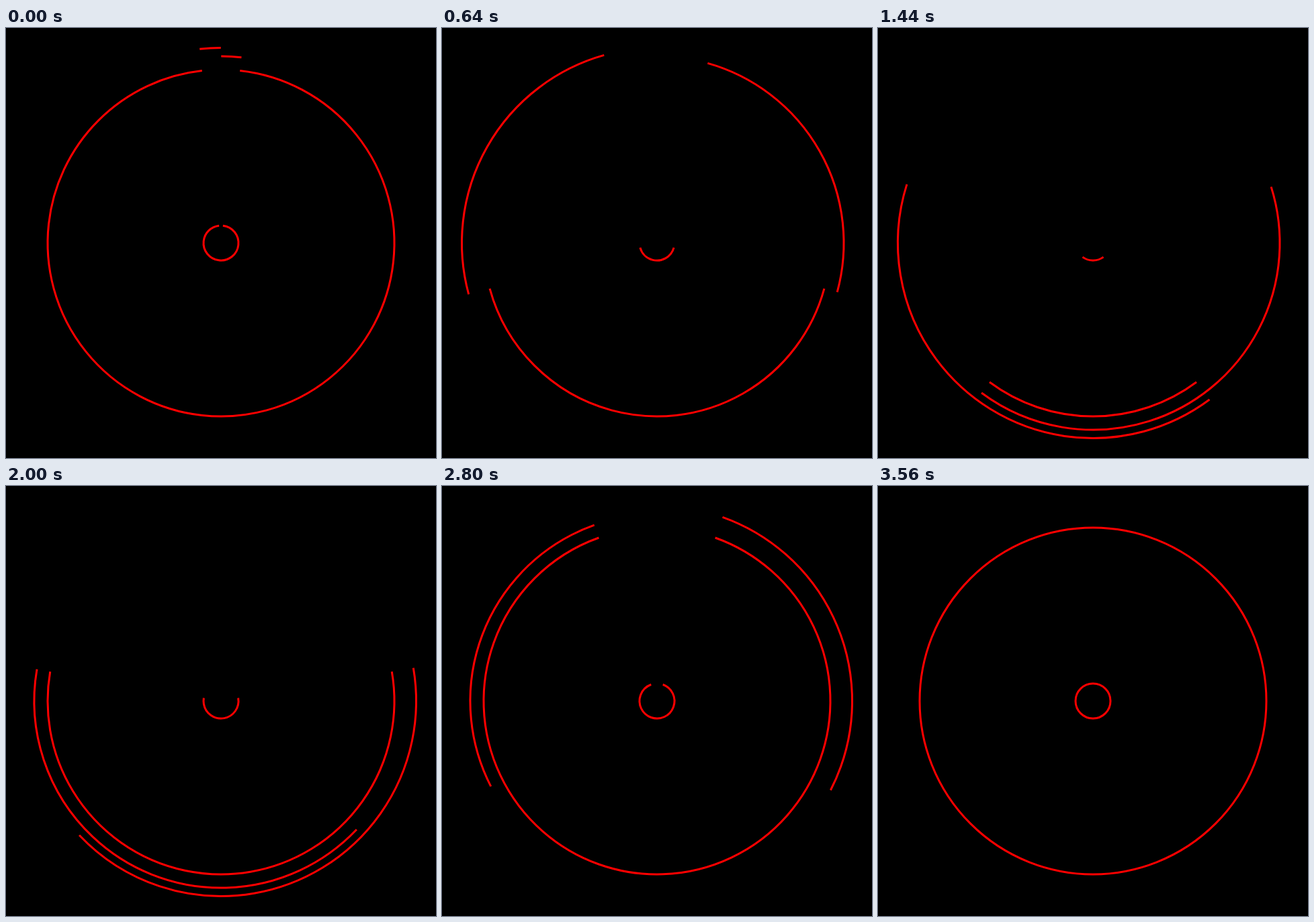
An HTML page with a canvas for the animation above (3.6 s loop, 640 by 640 pixels).

```html
<!DOCTYPE html>
<html lang="en">
<head>
<meta charset="utf-8">
<title>Ring sweep</title>
<style>
  html, body { margin: 0; width: 100%; height: 100%; overflow: hidden; background: #000; }
  canvas { display: block; }
</style>
</head>
<body>
<canvas id="stage" width="640" height="640"></canvas>
<script>
const ctx = document.getElementById("stage").getContext("2d");
const LOOP = 3600, STEP = 40, TURN = 2 * Math.PI, TOP = -Math.PI / 2;

// Angles run clockwise from the top.
function arc(radius, from, to) {
  ctx.beginPath();
  ctx.arc(320, 320, radius, TOP + from, TOP + to);
  ctx.stroke();
}

function draw(time) {
  const progress = (Math.floor(time % LOOP / STEP) + 1) * STEP / LOOP;
  const head = TURN * Math.sin(progress * Math.PI / 2);
  const tail = TURN * (1 - Math.cos(progress * Math.PI / 2));
  const gap = Math.min(head, TURN - head);

  ctx.fillStyle = "#000";
  ctx.fillRect(0, 0, 640, 640);
  ctx.strokeStyle = "#f00";
  ctx.lineWidth = 3;

  arc(26, gap, TURN - gap);
  arc(258, gap, TURN - gap);
  if (progress < 1) {
    arc(278, tail, head);
    arc(290.5, -head, -tail);
  }
}

const start = performance.now();
function tick() {
  draw(performance.now() - start);
  requestAnimationFrame(tick);
}
tick();
</script>
</body>
</html>
```
